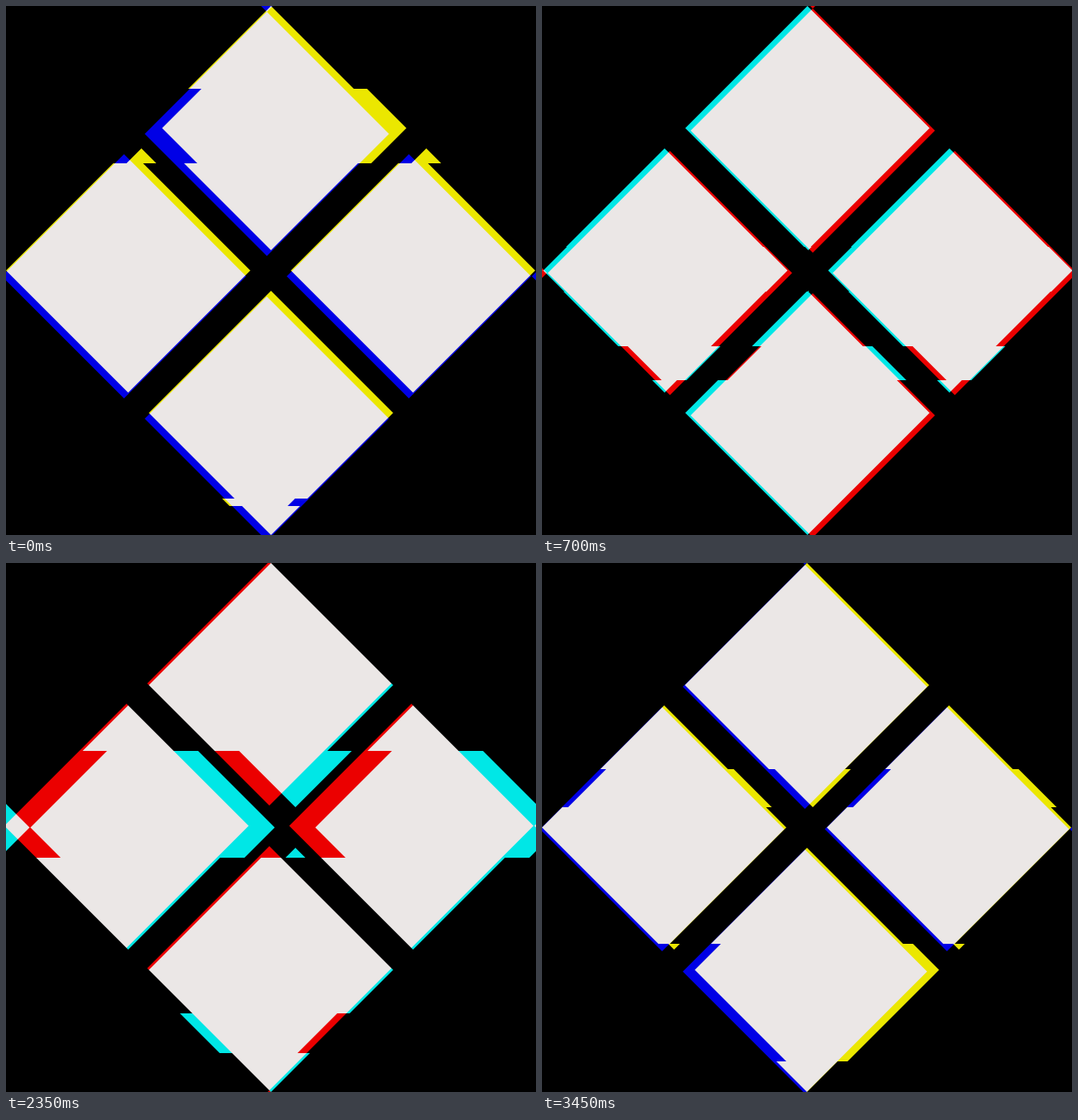
Animation of 640x639 px, one loop 4000 ms. Source, as an HTML page with a canvas:

```html
<!DOCTYPE html>
<html lang="en">
<head>
<meta charset="utf-8">
<title>Glitching diamonds</title>
<style>
  html, body { margin: 0; width: 100%; height: 100%; overflow: hidden; background: #000; }
  canvas { display: block; width: 640px; height: 639px; }
</style>
</head>
<body>
<canvas id="stage" width="640" height="639"></canvas>
<script>
const W = 640, H = 639, LOOP = 4000, RADIUS = 147.5;
const centers = [[320, 147.5], [147.5, 319.5], [491.5, 319.5], [320, 491.5]];
const ctx = document.getElementById('stage').getContext('2d');

const YELLOW = '#ebe700', BLUE = '#0000e6';
const CYAN = '#00e7e6', RED = '#eb0000';
const MAGENTA = '#eb00e6', GREEN = '#00e700';

// Each pose adds two complementary layers; slices shift rows of the first: [top, bottom, dx].
const poses = [
  { at: 0, sliced: [YELLOW, 0, 0], plain: [BLUE, -5, 7],
    slices: [[100, 190, 16], [595, 604, -15]] },
  { at: 100, sliced: [MAGENTA, 0, 0], plain: [GREEN, 3, 4],
    slices: [[236, 290, 10], [520, 566, -12]] },
  { at: 700, sliced: [CYAN, 0.5, 0], plain: [RED, 7, 3],
    slices: [[291, 345, 1], [411, 452, 11.5]] },
  { at: 1250, sliced: [CYAN, 0, 0], plain: [RED, -4, 3],
    slices: [[122, 170, -10], [384, 446, 12]] },
  { at: 1800, sliced: [MAGENTA, 0.5, 0], plain: [GREEN, 2, 6.5],
    slices: [[210, 308, -32], [485, 615, 28.5]] },
  { at: 2350, sliced: [CYAN, 0, 0], plain: [RED, -2, -2],
    slices: [[227, 356, 29.5], [544, 592, -15]] },
  { at: 2900, sliced: [YELLOW, 0.5, 0], plain: [BLUE, 10, 9],
    slices: [[96, 173, -2.5], [314, 439, 12]] },
  { at: 3450, sliced: [YELLOW, 0, 0], plain: [BLUE, -2.5, 2],
    slices: [[249, 295, 7], [460, 602, 12]] }
];

// Diamonds leaving one edge re-enter at the opposite one.
function fillDiamonds(color, dx, dy) {
  ctx.beginPath();
  for (const ox of [-W, 0, W]) {
    for (const oy of [-H, 0, H]) {
      for (const [cx, cy] of centers) {
        const x = cx + dx + ox, y = cy + dy + oy;
        ctx.moveTo(x, y - RADIUS);
        ctx.lineTo(x + RADIUS, y);
        ctx.lineTo(x, y + RADIUS);
        ctx.lineTo(x - RADIUS, y);
        ctx.closePath();
      }
    }
  }
  ctx.fillStyle = color;
  ctx.fill();
}

function fillBand(top, bottom, color, dx, dy) {
  ctx.save();
  ctx.beginPath();
  ctx.rect(0, top, W, bottom - top);
  ctx.clip();
  fillDiamonds(color, dx, dy);
  ctx.restore();
}

function drawPose({ sliced: [color, dx, dy], plain, slices }) {
  ctx.globalCompositeOperation = 'source-over';
  ctx.fillStyle = '#000';
  ctx.fillRect(0, 0, W, H);
  ctx.globalCompositeOperation = 'lighter';
  fillDiamonds(...plain);
  let y = 0;
  for (const [top, bottom, shift] of slices) {
    fillBand(y, top, color, dx, dy);
    fillBand(top, bottom, color, dx + shift, dy);
    y = bottom;
  }
  fillBand(y, H, color, dx, dy);
}

const start = performance.now();
let shown;

function tick() {
  const time = (performance.now() - start) % LOOP;
  const pose = poses.findLast(p => p.at <= time);
  if (pose !== shown) drawPose(shown = pose);
  requestAnimationFrame(tick);
}
tick();
</script>
</body>
</html>
```
